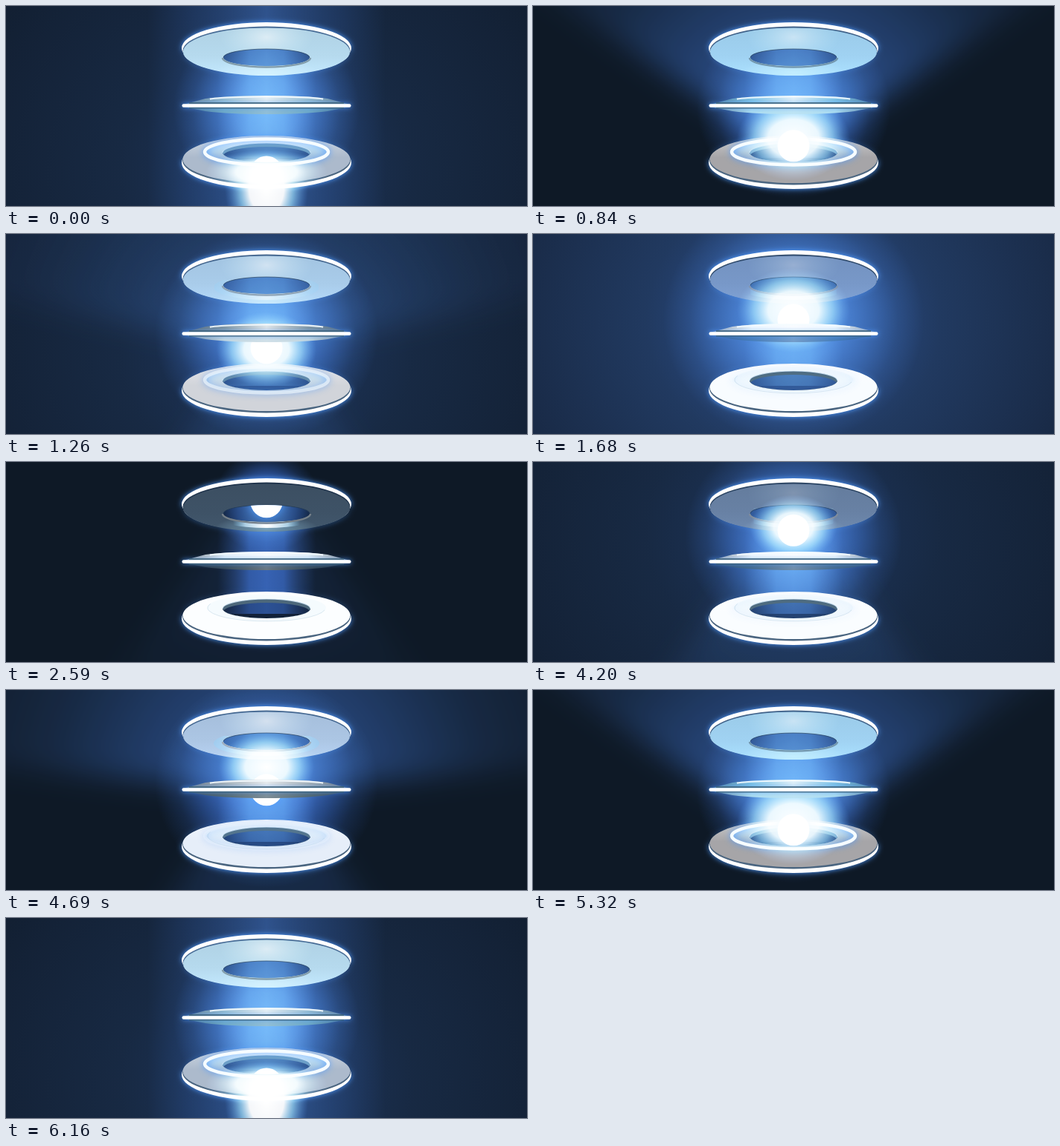
Write an HTML page with a canvas that moves like this. It is 700x270 px and loops after 6.23 s.

```html
<!DOCTYPE html>
<html lang="en">
<head>
<meta charset="utf-8">
<title>Light orb and rings</title>
<style>
html, body { margin: 0; width: 100%; height: 100%; overflow: hidden; background: #0e1926; }
canvas { display: block; width: 700px; height: 270px; }
</style>
</head>
<body>
<canvas id="stage" width="700" height="270"></canvas>
<script>
const ctx = document.getElementById('stage').getContext('2d');
const LOOP = 6230, STEP = 70, CX = 350;
const TAU = Math.PI * 2;

// Lighting at several heights of the orb; "at" is 1 at the bottom, -1 at the top.
const POSES = [
  { at: 1, ambient: .5, up: 0, spread: 1.6, down: 0, strip: .6, glow: 125, rise: 85, bloom: 30, lift: 6,
    top: [182, 218, 238], midTop: [150, 190, 212], midUnder: [110, 170, 200], low: [172, 186, 204], bevelTop: 0, bevelLow: 1 },
  { at: .635, ambient: 0, up: .8, spread: 1.6, down: 0, strip: 0, glow: 130, rise: 52, bloom: 76, lift: -10,
    top: [160, 210, 242], midTop: [125, 195, 230], midUnder: [170, 220, 240], low: [166, 165, 168], bevelTop: 0, bevelLow: 1 },
  { at: .3, ambient: .6, up: .3, spread: 4, down: .2, strip: 0, glow: 150, rise: 20, bloom: 68, lift: 8,
    top: [168, 205, 235], midTop: [120, 145, 160], midUnder: [215, 235, 245], low: [205, 207, 212], bevelTop: .4, bevelLow: .7 },
  { at: .052, ambient: 0, up: .7, spread: 11, down: .3, strip: 0, glow: 150, rise: 10, bloom: 64, lift: -31,
    top: [172, 198, 228], midTop: [165, 177, 184], midUnder: [82, 104, 114], low: [230, 238, 249], bevelTop: .8, bevelLow: .25 },
  { at: -.158, ambient: 1, up: 0, spread: 8, down: 0, strip: 0, glow: 175, rise: 0, bloom: 76, lift: -13,
    top: [120, 152, 200], midTop: [238, 248, 255], midUnder: [70, 125, 185], low: [248, 252, 255], bevelTop: .7, bevelLow: .1 },
  { at: -.62, ambient: .15, up: 0, spread: 3, down: .5, strip: 0, glow: 125, rise: -12, bloom: 46, lift: 2,
    top: [92, 112, 138], midTop: [240, 248, 252], midUnder: [65, 92, 112], low: [252, 254, 255], bevelTop: .9, bevelLow: .05 },
  { at: -.88, ambient: 0, up: 0, spread: 2, down: .16, strip: 0, glow: 72, rise: 0, bloom: 6, lift: 12,
    top: [62, 82, 102], midTop: [230, 242, 250], midUnder: [55, 75, 90], low: [252, 254, 255], bevelTop: 1, bevelLow: 0 }
];

const mix = (a, b, k) => Array.isArray(a) ? a.map((v, i) => mix(v, b[i], k)) : a + (b - a) * k;
const clamp = v => Math.max(0, Math.min(1, v));
const rgb = (c, a = 1) => `rgba(${c.map(Math.round).join(',')},${a})`;
const shade = (c, k) => c.map(v => v * k);

function poseAt(c) {
  let i = 0;
  while (i < POSES.length - 2 && c < POSES[i + 1].at) i++;
  const a = POSES[i], b = POSES[i + 1];
  const k = clamp((a.at - c) / (a.at - b.at));
  const pose = {};
  for (const key in a) pose[key] = mix(a[key], b[key], k);
  return pose;
}

function layer(draw, mode = 'source-over') {
  ctx.save();
  ctx.globalCompositeOperation = mode;
  draw();
  ctx.restore();
}

function oval(y, rx, ry) {
  ctx.moveTo(CX + rx, y);
  ctx.ellipse(CX, y, rx, ry, 0, 0, TAU);
}

function fillOvals(style, ...ovals) {
  ctx.beginPath();
  ovals.forEach(o => oval(...o));
  ctx.fillStyle = style;
  ctx.fill('evenodd');
}

function arc(y, rx, ry, from, to, style, width) {
  ctx.beginPath();
  ctx.ellipse(CX, y, rx, ry, 0, from * Math.PI, to * Math.PI);
  ctx.strokeStyle = style;
  ctx.lineWidth = width;
  ctx.stroke();
}

function addStops(gradient, stops) {
  stops.forEach(([at, color, alpha]) => gradient.addColorStop(at, rgb(color, alpha)));
  return gradient;
}

function halo(y, rx, ry, stops) {
  layer(() => {
    ctx.translate(CX, y);
    ctx.scale(1, ry / rx);
    ctx.fillStyle = addStops(ctx.createRadialGradient(0, 0, 0, 0, 0, rx), stops);
    ctx.fillRect(-rx, -rx, rx * 2, rx * 2);
  }, 'screen');
}

const BLUE = [56, 110, 230], DEEP = [30, 62, 135], WHITE = [255, 255, 255], CYAN = [140, 212, 255];

function wedge(y, edge, spread, alpha) {
  if (alpha < .01) return;
  layer(() => {
    const far = edge ? 330 : -60, half = Math.abs(far - y) * spread;
    ctx.filter = 'blur(18px)';
    ctx.globalAlpha = alpha;
    ctx.fillStyle = addStops(ctx.createRadialGradient(CX, y, 0, CX, y, 400),
      [[0, [50, 95, 190], 1], [.4, [30, 58, 115], 1], [.75, [14, 26, 50], .9], [1, [10, 18, 36], .6]]);
    ctx.beginPath();
    ctx.moveTo(CX - 25, y);
    ctx.lineTo(CX - half, far);
    ctx.lineTo(CX + half, far);
    ctx.lineTo(CX + 25, y);
    ctx.fill();
  }, 'screen');
}

function band(half, top, height, stops) {
  layer(() => {
    const g = ctx.createLinearGradient(CX - half, 0, CX + half, 0);
    stops.forEach(([at, color, alpha]) => {
      g.addColorStop(at / 2, rgb(color, alpha));
      g.addColorStop(1 - at / 2, rgb(color, alpha));
    });
    ctx.fillStyle = g;
    ctx.fillRect(CX - half, top, half * 2, height);
  }, 'screen');
}

function backdrop(p, y) {
  ctx.fillStyle = '#0e1926';
  ctx.fillRect(0, 0, 700, 270);
  if (p.ambient > .01) halo(y, 440, 400, [
    [0, [34, 66, 135], p.ambient], [.45, [20, 36, 68], p.ambient], [.85, [12, 20, 40], p.ambient], [1, [10, 17, 34], p.ambient * .8]]);
  wedge(y, 0, p.spread, p.up);
  wedge(y, 1, .85, p.down);
  if (p.strip > .01) band(160, 0, 270, [[0, DEEP, 0], [.35, DEEP, p.strip * .45], [1, [45, 85, 170], p.strip]]);
  halo(y - p.rise, p.glow, p.glow * .95, [[0, BLUE, 1], [.35, BLUE, .75], [.6, DEEP, .75], [.8, DEEP, .28], [1, DEEP, 0]]);
  // column of light through the holes
  const top = Math.min(y, 50);
  band(66, top, 205 - top, [[0, DEEP, 0], [.35, [38, 72, 155], .4], [.65, [46, 92, 200], .7], [1, [50, 98, 210], .75]]);
}

function withGlow(draw, blur = 7) {
  ctx.save();
  ctx.shadowColor = '#4f9bff';
  ctx.shadowBlur = blur;
  draw();
  ctx.restore();
}

function topRing(p) {
  const hole = [69.5, 58, 11.5];
  const light = clamp((p.top[0] - 70) / 110);
  withGlow(() => fillOvals('#fff', [57, 114, 35], [62, 112, 31]));
  fillOvals(rgb(mix([32, 52, 76], [72, 108, 150], light)), [60.5, 112.5, 33], hole);
  const g = ctx.createLinearGradient(0, 28, 0, 94);
  g.addColorStop(0, rgb(shade(p.top, .96)));
  g.addColorStop(.6, rgb(p.top));
  g.addColorStop(1, rgb(shade(p.top, 1.07)));
  fillOvals(g, [61.7, 112, 32.3], hole);
  layer(() => {
    ctx.beginPath();
    oval(62, 112, 32);
    oval(...hole);
    ctx.clip('evenodd');
    halo(42, 62, 34, [[0, WHITE, light * .55], [1, CYAN, 0]]);
    halo(90, 70, 18, [[0, CYAN, .55], [1, CYAN, 0]]);
  });
  if (p.bevelTop > .01) {
    const half = 45 + 28 * light;
    const shine = addStops(ctx.createRadialGradient(CX, 82, 4, CX, 82, half),
      [[0, WHITE, p.bevelTop], [.6, [200, 235, 255], p.bevelTop * .75], [1, CYAN, p.bevelTop * light * .5]]);
    ctx.save();
    ctx.beginPath();
    ctx.rect(CX - half, 62, half * 2, 40);
    ctx.clip();
    fillOvals(shine, [72, 71, 17], hole);
    ctx.restore();
  }
  fillOvals(`rgba(14,30,58,${.35 - .25 * light})`, hole);
  arc(70, 59, 12.5, 0, 1, rgb(mix(shade(p.top, .72), WHITE, p.bevelTop * .35)), 2.4);
  arc(69.5, 58, 11.5, 1, 2, 'rgba(35,60,90,.65)', 1);
}

function lowRing(p) {
  const hole = [198, 59, 13], bevel = [197, 83, 17.5];
  withGlow(() => fillOvals('#fff', [211.5, 114, 35.5], [207, 112, 31]));
  fillOvals('#4a6580', [208.5, 113, 33], hole);
  const g = ctx.createLinearGradient(0, 175, 0, 240);
  g.addColorStop(0, rgb(mix(p.low, WHITE, .45)));
  g.addColorStop(.45, rgb(p.low));
  g.addColorStop(1, rgb(p.low));
  fillOvals(g, [207, 112.5, 32], hole);
  fillOvals(rgb(mix(p.low, [215, 235, 248], .5), .45), [197, 80, 18], hole);
  arc(197, 79, 18, .05, 1.1, 'rgba(125,165,190,.22)', 1);
  // far wall of the hole
  fillOvals('rgba(16,34,62,.25)', hole);
  ctx.save();
  ctx.beginPath();
  oval(...hole);
  ctx.clip();
  fillOvals(rgb(mix([77, 104, 123], [110, 160, 200], p.bevelLow)), hole, [203, 59, 13]);
  ctx.restore();
  arc(...hole, 1, 2, 'rgba(220,240,255,.8)', 1.2);
  if (p.bevelLow > .01) {
    layer(() => {
      ctx.globalAlpha = p.bevelLow;
      const shine = addStops(ctx.createLinearGradient(0, 178, 0, 204), [[0, WHITE, 1], [.4, [215, 240, 255], .85], [1, CYAN, .1]]);
      fillOvals(shine, bevel, hole);
      withGlow(() => arc(...bevel, 0, 2, '#f6fcff', 4.5), 9);
    });
  }
}

function orb(y) {
  ctx.save();
  ctx.beginPath();
  oval(69.5, 58, 11.5);
  ctx.rect(CX - 58, 69.5, 116, 128.5);
  oval(198, 59, 13);
  ctx.clip();
  withGlow(() => {
    ctx.beginPath();
    ctx.arc(CX, y, 21.5, 0, TAU);
    ctx.fillStyle = '#fff';
    ctx.fill();
  }, 12);
  ctx.restore();
}

function slab(edge, shoulder, flat, style) {
  ctx.beginPath();
  ctx.moveTo(238, edge);
  ctx.lineTo(268, shoulder);
  ctx.quadraticCurveTo(300, flat, CX, flat);
  ctx.quadraticCurveTo(400, flat, 432, shoulder);
  ctx.lineTo(462, edge);
  ctx.closePath();
  ctx.fillStyle = style;
  ctx.fill();
}

function across(color, center) {
  const side = shade(color, .7);
  return addStops(ctx.createLinearGradient(238, 0, 462, 0),
    [[0, side, .8], [.25, color, 1], [.5, mix(color, WHITE, center), 1], [.75, color, 1], [1, side, .8]]);
}

function middleRing(p) {
  slab(133, 125, 121, across(p.midTop, .75));
  slab(136, 142, 146, across(p.midUnder, .25));
  arc(127, 80, 4.5, 1.1, 1.9, 'rgba(245,252,255,.9)', 2.2);
  withGlow(() => {
    ctx.beginPath();
    ctx.roundRect(236.5, 132.3, 227, 4.4, 2);
    ctx.fillStyle = '#fff';
    ctx.fill();
  });
  ctx.fillStyle = '#3d6178';
  ctx.fillRect(246, 130.2, 208, 1.6);
  ctx.fillRect(246, 137.2, 208, 1.2);
}

// light pouring out below the lowest ring
function spill(k) {
  if (k < .01) return;
  halo(224, 82, 30, [[0, WHITE, k], [.5, [225, 247, 255], k * .95], [.75, CYAN, k * .45], [1, BLUE, 0]]);
  layer(() => {
    ctx.beginPath();
    ctx.rect(CX - 65, 215, 130, 55);
    ctx.clip();
    halo(246, 56, 80, [[0, WHITE, k], [.42, WHITE, k * .95], [.65, CYAN, k * .65], [1, BLUE, 0]]);
  });
}

function render(ms) {
  const c = Math.cos((ms + 35) / LOOP * TAU);
  const y = 130 + 90 * c + 4 * c * c;
  const p = poseAt(c);
  backdrop(p, y);
  lowRing(p);
  topRing(p);
  orb(y);
  halo(y + p.lift, p.bloom, p.bloom * .75, [[0, WHITE, 1], [.45, [235, 248, 255], .95], [.7, CYAN, .6], [1, BLUE, 0]]);
  middleRing(p);
  spill(clamp((c - .78) / .2));
}

function tick(now) {
  render(Math.floor(now % LOOP / STEP) * STEP);
  requestAnimationFrame(tick);
}
render(0);
requestAnimationFrame(tick);
</script>
</body>
</html>
```
